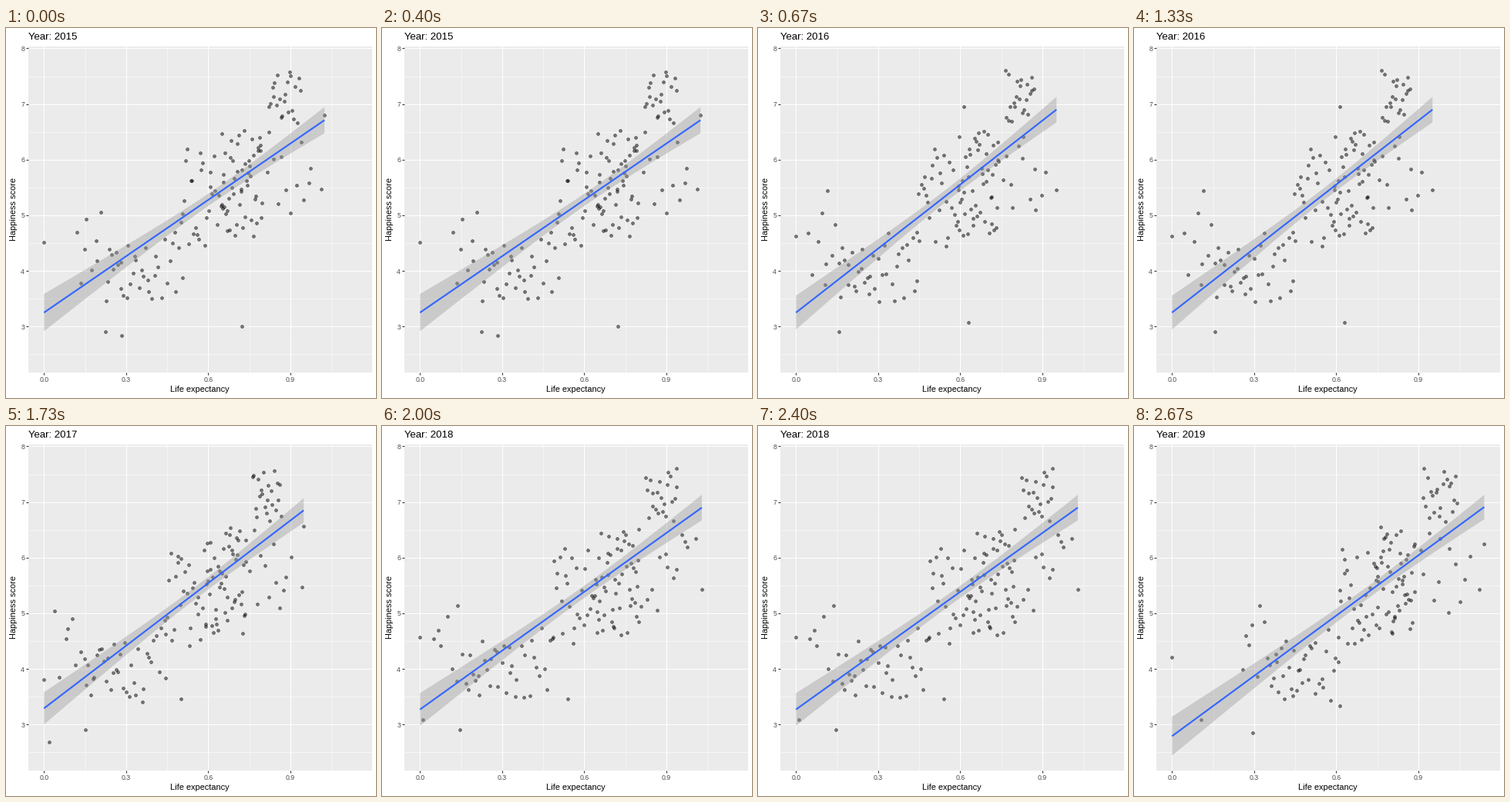
A matplotlib script for the animation above (3.33 s loop, 480 by 480 pixels).

```python
import numpy as np
import matplotlib.pyplot as plt
from matplotlib.animation import FuncAnimation
from matplotlib.ticker import FixedLocator, FormatStrFormatter

SIZE = 480
DPI = 72
LEFT, RIGHT, TOP, BOTTOM = 29.05, 474.5, 24, 446.7   # panel edges in pixels
X0, X_UNIT = 49.3, 355.0
Y3, Y_UNIT = 387.2, 72.15
FIRST_YEAR = 2015

# per year: last x, fit at both ends, half width of the band at both ends
FITS = [
    (1.025, 3.25, 6.71, .335, .235),
    (.952, 3.25, 6.90, .305, .230),
    (.949, 3.29, 6.85, .290, .220),
    (1.030, 3.27, 6.90, .295, .230),
    (1.141, 2.79, 6.91, .350, .220),
]
WAIST = .11

# how far the lower clouds move right in each year
LAGS = [.07, 0, 0, 0, .19]

# clouds as (count, x from, x to, y from, y to), x as a share of the last x
CLOUDS = [
    (8, .04, .16, 3.75, 5.15),
    (22, .16, .34, 3.45, 4.5),
    (13, .34, .47, 3.4, 4.75),
    (28, .46, .63, 4.4, 6.2),
    (48, .62, .78, 4.6, 6.55),
    (13, .77, .96, 5.0, 6.5),
    (22, .80, .915, 6.65, 7.6),
]

# per year: points that stand apart from the clouds
LONERS = [
    [(0, 4.51), (.224, 2.9), (.285, 2.84), (.722, 3), (1.013, 5.47), (1.025, 6.8)],
    [(0, 4.63), (.115, 5.44), (.157, 2.9), (.63, 3.07), (.614, 6.95), (.952, 5.45)],
    [(0, 3.81), (.019, 2.69), (.152, 2.9), (.5, 3.46), (.943, 5.47), (.949, 6.57)],
    [(0, 4.57), (.01, 3.08), (.145, 2.9), (.54, 3.46), (1.03, 5.43), (1.007, 6.34)],
    [(0, 4.21), (.105, 3.08), (.295, 2.85), (.614, 3.33), (1.122, 5.43), (1.141, 6.25)],
]


def spread(rng, n, low, high):
    """Evenly filled but shuffled values between two limits."""
    return low + (high - low) * (rng.permutation(n) + rng.random(n)) / n


def points(i):
    rng = np.random.default_rng(FIRST_YEAR + i)
    parts = [np.array(LONERS[i])]
    for n, xa, xb, ya, yb in CLOUDS:
        share = spread(rng, n, xa, xb)
        share += LAGS[i] * np.clip(1 - share / .75, 0, 1)
        parts.append(np.column_stack([share * FITS[i][0],
                                      spread(rng, n, ya, yb)]))
    return np.vstack(parts)


def fit(i):
    """Regression line and the hyperbolic confidence band around it."""
    end, ya, yb, wa, wb = FITS[i]
    x = np.linspace(0, end, 80)
    y = ya + (yb - ya) * x / end
    ra, rb = np.sqrt(wa**2 - WAIST**2), np.sqrt(wb**2 - WAIST**2)
    half = np.hypot(WAIST, (ra + rb) / end * x - ra)
    band = np.vstack([np.column_stack([x, y + half]),
                      np.column_stack([x, y - half])[::-1]])
    return x, y, band


plt.rcParams["font.family"] = "Liberation Sans"
fig = plt.figure(figsize=(SIZE / DPI, SIZE / DPI), dpi=DPI, facecolor="white")
ax = fig.add_axes([LEFT / SIZE, 1 - BOTTOM / SIZE,
                   (RIGHT - LEFT) / SIZE, (BOTTOM - TOP) / SIZE],
                  facecolor="#EBEBEB")
ax.set_xlim((LEFT - X0) / X_UNIT, (RIGHT - X0) / X_UNIT)
ax.set_ylim(3 + (Y3 - BOTTOM) / Y_UNIT, 3 + (Y3 - TOP) / Y_UNIT)
for spine in ax.spines.values():
    spine.set_visible(False)

ax.xaxis.set_major_locator(FixedLocator(np.arange(4) * .3))
ax.xaxis.set_minor_locator(FixedLocator(np.arange(4) * .3 + .15))
ax.xaxis.set_major_formatter(FormatStrFormatter("%.1f"))
ax.yaxis.set_major_locator(FixedLocator(np.arange(3, 9)))
ax.yaxis.set_minor_locator(FixedLocator(np.arange(2.5, 8)))
ax.tick_params(which="major", length=2.75, width=1.07, pad=2.2,
               color="#333333", labelcolor="#4D4D4D", labelsize=8.8)
ax.tick_params(which="minor", length=0)
ax.grid(which="major", color="white", linewidth=1.07)
ax.grid(which="minor", color="white", linewidth=.53)
ax.set_axisbelow(True)

title = fig.text(LEFT / SIZE, 1 - 15 / SIZE, "", size=13.2, va="baseline")
fig.text((LEFT + RIGHT) / 2 / SIZE, 1 - 472 / SIZE, "Life expectancy",
         size=11, ha="center", va="baseline")
fig.text(13 / SIZE, 1 - (TOP + BOTTOM) / 2 / SIZE, "Happiness score", size=11,
         rotation=90, rotation_mode="anchor", ha="center", va="baseline")

dots = ax.scatter([], [], s=3.9**2, facecolor=(0, 0, 0, .5),
                  edgecolor=(0, 0, 0, .5), linewidth=.7, zorder=2)
ribbon = plt.Polygon([(0, 0), (0, 0)], facecolor="#999999", alpha=.4,
                     linewidth=0, zorder=3)
ax.add_patch(ribbon)
line, = ax.plot([], [], color="#3366FF", linewidth=2.13,
                solid_capstyle="butt", zorder=4)


def draw(i):
    x, y, band = fit(i)
    title.set_text(f"Year: {FIRST_YEAR + i}")
    dots.set_offsets(points(i))
    ribbon.set_xy(band)
    line.set_data(x, y)
    return title, dots, ribbon, line


anim = FuncAnimation(fig, draw, frames=len(FITS), interval=666,
                     repeat=True, repeat_delay=0, blit=False)
plt.show()
```
